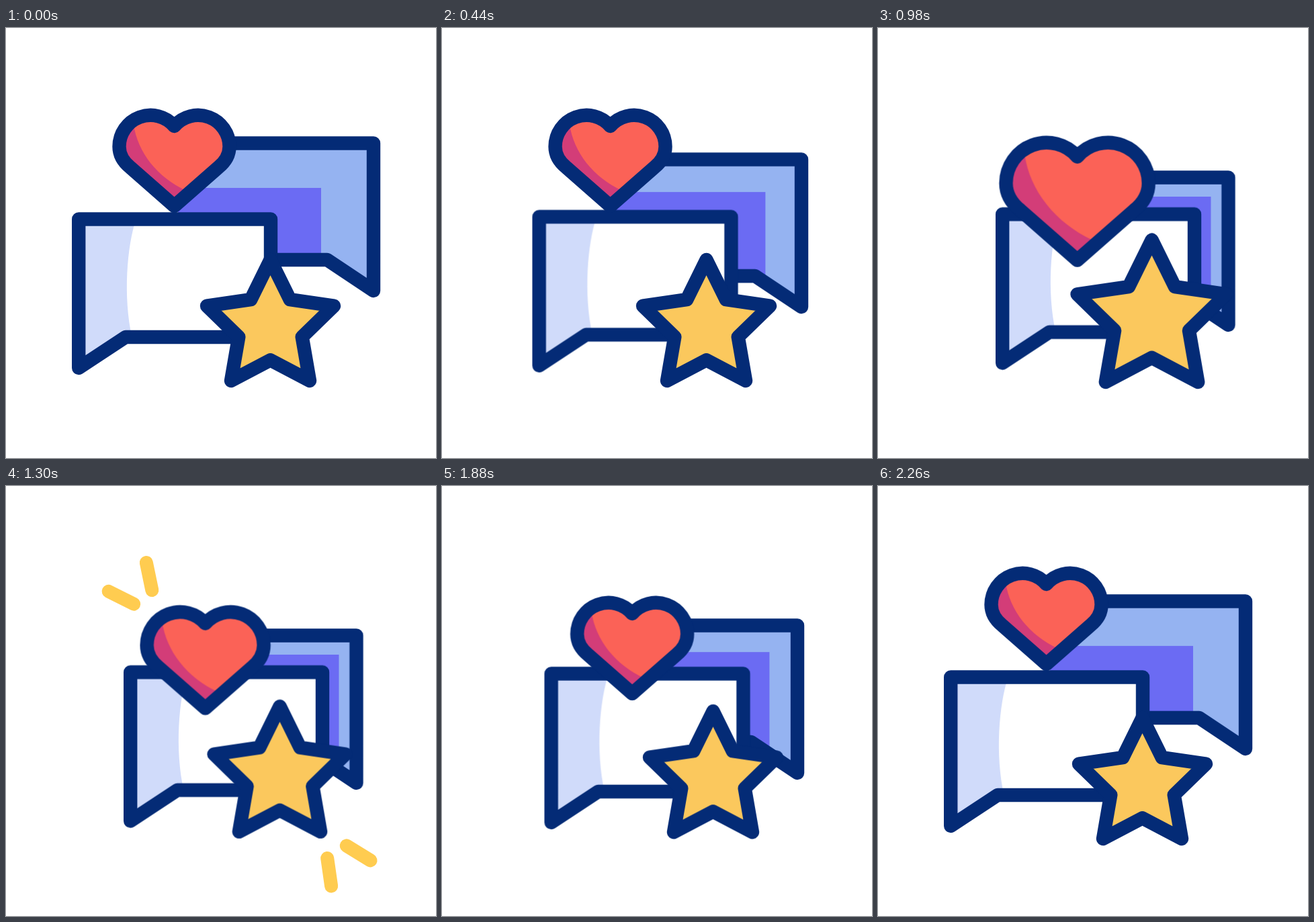
An HTML page without scripts for the animation above (2400 ms loop, 640 by 640 pixels).

```html
<!DOCTYPE html>
<html lang="en">
<head>
<meta charset="utf-8">
<title>Chat bubbles</title>
<style>
@property --head { syntax: "<number>"; inherits: false; initial-value: 0; }
@property --tail { syntax: "<number>"; inherits: false; initial-value: 0; }

html, body { margin: 0; width: 100%; height: 100%; overflow: hidden; background: #fff; }
svg { display: block; width: 100vw; height: 100vh; }

.line {
  stroke: #042b76; stroke-width: 20.4;
  stroke-linecap: round; stroke-linejoin: round;
  vector-effect: non-scaling-stroke;
}

.bubble, .icon, .beat, .spark line {
  animation: 2.4s cubic-bezier(.333, 0, .667, 1) infinite;
}
.bubble { animation-name: slide; }
.icon { animation-name: follow; }
.beat { animation-name: beat; }

.back { --x: -25.5px; --y: 51px; }
.shade { --x: 51.5px; --y: -38px; }
.front { --x: 77px; --y: -7.4px; }
.heart { --x: 46.1px; --y: 62px; }
.star { --x: 14px; --y: -13.8px; }
.heart .beat { --size: 1.3; transform-origin: 250.5px 202px; }
.star .beat { --size: 1.178; transform-origin: 393.5px 435px; }

.spark line {
  animation-name: show, grow, shrink;
  stroke: #ffcc50; stroke-width: 20; stroke-linecap: round;
  stroke-dasharray: calc((var(--head) - var(--tail)) * 1px) 200px;
  stroke-dashoffset: calc(var(--tail) * -1px);
  visibility: hidden;
}

@keyframes slide {
  0%, 8.333% { transform: translate(0, 0); }
  29.167%, 69.444% { transform: translate(var(--x), var(--y)); }
  94.375%, 100% { transform: translate(0, 0); }
}
@keyframes follow {
  0%, 19.444% { transform: translate(0, 0); }
  31.944%, 69.444% { transform: translate(var(--x), var(--y)); }
  94.375%, 100% { transform: translate(0, 0); }
}
@keyframes beat {
  0%, 31.944%, 51.389%, 70.833%, 100% { transform: scale(1); }
  41.667%, 61.111% { transform: scale(var(--size)); }
}
@keyframes show {
  0%, 100% { visibility: hidden; animation-timing-function: step-end; }
  46% { visibility: visible; animation-timing-function: step-end; }
  61.9% { visibility: hidden; animation-timing-function: step-end; }
}
@keyframes grow {
  0%, 45.833% { --head: 0; }
  56.25%, 100% { --head: 56; }
}
@keyframes shrink {
  0%, 51.667% { --tail: 0; }
  62.083%, 100% { --tail: 56; }
}
</style>
</head>
<body>
<svg viewBox="0 0 640 640" fill="none">
  <clipPath id="backArea">
    <path d="M256 171.5H547V391L478 345H256Z"/>
  </clipPath>

  <g class="bubble back">
    <g clip-path="url(#backArea)">
      <rect x="250" y="165" width="300" height="230" fill="#95b3f1"/>
      <rect class="bubble shade" x="150" y="238" width="319" height="220" fill="#6b6bf3"/>
    </g>
    <path class="line" d="M325 171.5H547V391L478 345H400"/>
  </g>

  <g class="bubble front">
    <path fill="#fff" d="M108.2 284.5H394V460H178L108.2 506Z"/>
    <path fill="#d0dbfa" d="M108.2 284.5H193.5C180 325 174 400 187.5 460H178L108.2 506Z"/>
    <path class="line" d="M394 400V284.5H108.2V506L178 460H350"/>
  </g>

  <g class="spark">
    <line x1="197.7" y1="179.4" x2="147" y2="154"/>
    <line x1="219" y1="163.3" x2="207.7" y2="108.6"/>
    <line x1="477" y1="545.6" x2="485" y2="601.4"/>
    <line x1="499.6" y1="531" x2="547.5" y2="560.4"/>
  </g>

  <g class="icon heart">
    <g class="beat">
      <path id="heart" fill="#fb6257" d="M250.5 146A46.7 46.7 0 0 0 168.5 176.5C168.5 189 175 199.5 185 207.5L250.5 265L316 207.5C326 199.5 332.5 189 332.5 176.5A46.7 46.7 0 0 0 250.5 146Z"/>
      <path fill="#d33d78" d="M190 144C196 185 225 222 268 242L250.5 265L185 207.5C175 199.5 168.5 189 168.5 176.5C168.5 163 177 150 190 144Z"/>
      <path class="line" d="M250.5 146A46.7 46.7 0 0 0 168.5 176.5C168.5 189 175 199.5 185 207.5L250.5 265L316 207.5C326 199.5 332.5 189 332.5 176.5A46.7 46.7 0 0 0 250.5 146Z"/>
    </g>
  </g>

  <g class="icon star">
    <g class="beat">
      <path class="line" fill="#fbc85d" d="M393.5 345L422.7 404.2L488 413.7L440.7 459.8L452 525L393.5 494.2L335 525L346.3 459.8L299 413.7L364.3 404.2Z"/>
    </g>
  </g>
</svg>
</body>
</html>
```
